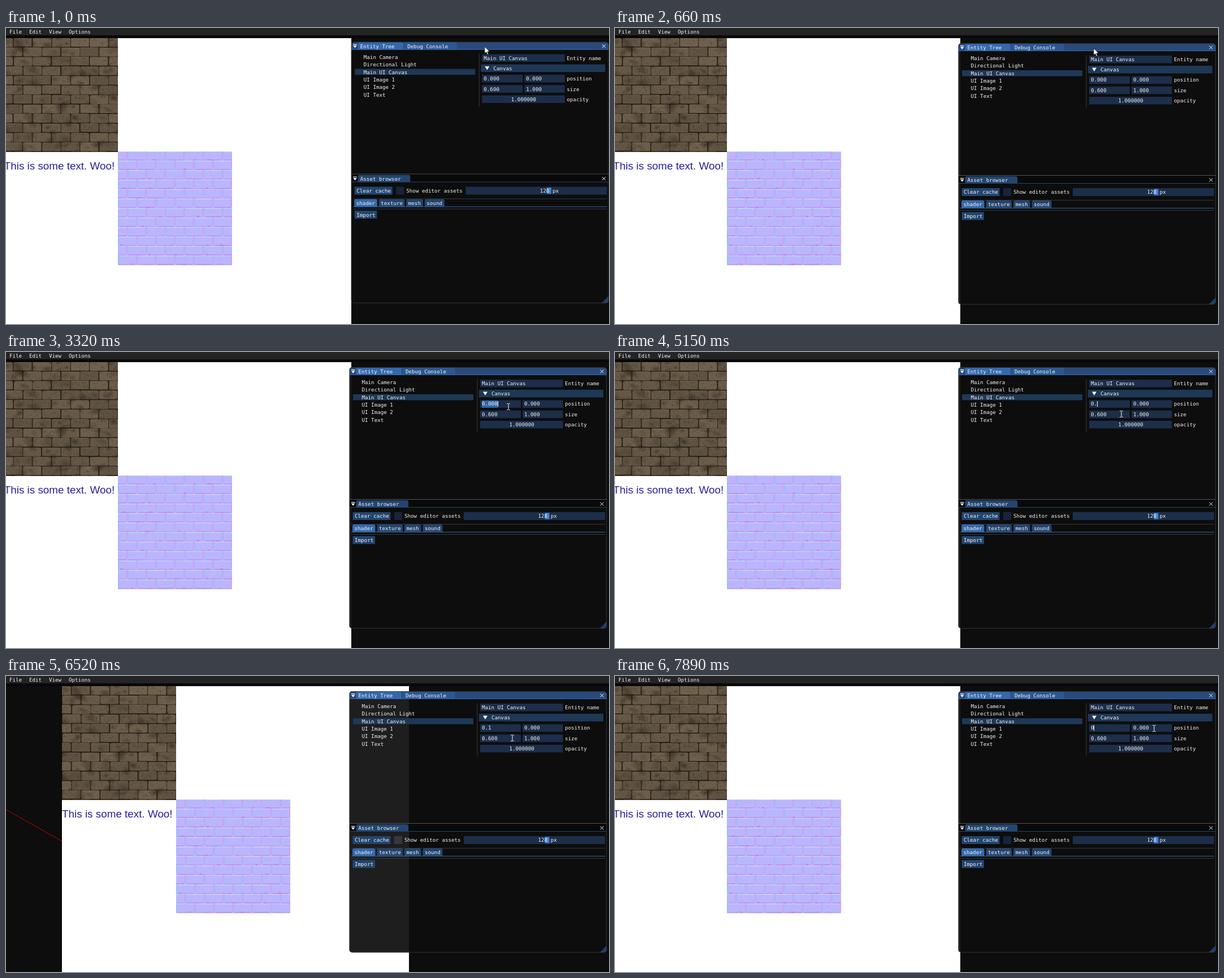
These frames come from a looping animation (1067 px wide and 525 px high, 8000 ms). An HTML page with a canvas:

```html
<!DOCTYPE html>
<html lang="en">
<head>
<meta charset="utf-8">
<title>Scene editor</title>
<style>
  html, body { margin: 0; width: 100%; height: 100%; overflow: hidden; background: #0d0d0d; }
  canvas { display: block; }
</style>
</head>
<body>
<canvas id="stage" width="1067" height="525"></canvas>
<script>
const ctx = document.getElementById('stage').getContext('2d');
const LOOP = 8000, CHAR = 5.54, TEXTURE = 202;
const MONO = '9.2px "DejaVu Sans Mono", monospace';
const FIELD = '#1c2e4a', BUTTON = '#23456f', TAB = '#3369ad', HEADER = '#1e3857', RULE = '#3a3a42';

let seed = 7;
const random = () => (seed = (seed * 16807) % 2147483647) / 2147483647;
const between = (a, b) => a + (b - a) * random();

// ---- Textures ----
function makeBricks(mortar, paintBrick, finish) {
  const canvas = document.createElement('canvas');
  canvas.width = canvas.height = TEXTURE;
  const g = canvas.getContext('2d');
  const w = TEXTURE / 6, h = TEXTURE / 12;
  g.fillStyle = mortar;
  g.fillRect(0, 0, TEXTURE, TEXTURE);
  for (let row = 0; row <= 12; row++)
    for (let col = -1; col < 6; col++)
      paintBrick(g, (col + (row % 2 ? 0 : 0.5)) * w, row * h - 1, w, h);
  finish(g);
  return canvas;
}

function speckle(g, x, y, w, h, count, color) {
  for (let i = 0; i < count; i++) {
    g.fillStyle = color();
    g.fillRect(between(x, x + w), between(y, y + h), between(1, 3), between(0.6, 1.6));
  }
}

const stone = makeBricks('#2b231a', (g, x, y, w, h) => {
  const jitter = () => between(0, 0.9);
  const left = x + 0.4 + jitter(), top = y + 0.4 + jitter();
  const width = w - 1 - jitter(), height = h - 1 - jitter();
  g.fillStyle = `hsl(34 18% ${between(31, 37)}%)`;
  g.beginPath();
  g.roundRect(left, top, width, height, between(1, 3));
  g.fill();
  g.fillStyle = 'rgba(150,134,110,.25)';
  g.fillRect(left + 2, top, width - 4, 1);
  speckle(g, left, top, width - 2, height - 1, 45, () =>
    random() < 0.55 ? `rgba(40,32,22,${between(0.05, 0.3)})` : `rgba(145,128,102,${between(0.05, 0.25)})`);
}, g => {
  for (let i = 0; i < 150; i++) {
    const r = between(2, 9);
    g.save();
    g.translate(between(0, TEXTURE), between(0, TEXTURE));
    g.rotate(between(-0.6, 0.6));
    g.scale(between(1, 2.2), 1);
    const blot = g.createRadialGradient(0, 0, 0, 0, 0, r);
    blot.addColorStop(0, `rgba(30,23,15,${between(0.1, 0.4)})`);
    blot.addColorStop(1, 'rgba(30,23,15,0)');
    g.fillStyle = blot;
    g.fillRect(-r, -r, 2 * r, 2 * r);
    g.restore();
  }
});

const normals = makeBricks('#c4b2f4', (g, x, y, w, h) => {
  const edge = (color, ex, ey, ew, eh) => {
    g.globalAlpha = between(0.4, 1);
    g.fillStyle = color;
    g.fillRect(ex, ey, ew, eh);
    g.globalAlpha = 1;
  };
  g.fillStyle = '#bab6fd';
  g.beginPath();
  g.roundRect(x + 0.7, y + 0.7, w - 1.4, h - 1.4, 2.5);
  g.fill();
  edge('#d8e4fc', x + 2, y + 0.6, w - 4, 1);
  edge('#bd7cea', x + 2, y + h - 1.4, w - 4, 1.2);
  edge('#74cdf2', x + 0.5, y + 2, 1.2, h - 4);
  edge('#e58af0', x + w - 1.6, y + 2, 1.1, h - 4);
  if (random() < 0.5) edge('#7ff0dc', x + between(0, 22), y + 0.4, between(3, 10), 1.3);
  if (random() < 0.5) edge('#d55fe8', x + between(2, 28), y + h - 2, between(2, 6), 1.5);
  speckle(g, x + 2, y + 2, w - 5, h - 4, 10, () =>
    random() < 0.5 ? 'rgba(205,190,255,.3)' : 'rgba(165,165,246,.3)');
}, () => {});

// ---- Drawing helpers ----
function rect(x, y, right, bottom, color, radius = 0) {
  ctx.fillStyle = color;
  ctx.beginPath();
  ctx.roundRect(x, y, right - x, bottom - y, radius);
  ctx.fill();
}
function shape(color, ...points) {
  ctx.fillStyle = color;
  ctx.beginPath();
  points.forEach(([x, y]) => ctx.lineTo(x, y));
  ctx.closePath();
  ctx.fill();
}
function line(color, x1, y1, x2, y2, width = 1) {
  ctx.strokeStyle = color;
  ctx.lineWidth = width;
  ctx.beginPath();
  ctx.moveTo(x1, y1);
  ctx.lineTo(x2, y2);
  ctx.stroke();
}
function label(text, x, middle) {
  ctx.font = MONO;
  ctx.fillStyle = '#f4f4f4';
  ctx.fillText(text, x, Math.round(middle + 3));
}
function field(text, x, y, right) {
  rect(x, y, right, y + 13.5, FIELD);
  label(text, x + 3, y + 6.8);
}
function button(text, x, y, right, color = BUTTON, radius = 0) {
  rect(x, y, right, y + 14, color, radius);
  label(text, x + 3.5, y + 7);
}
function titleIcons(y) {
  rect(611, y - 3.5, 617.5, y - 2.3, '#fff');
  shape('#fff', [611, y - 1], [617.5, y - 1], [614.2, y + 3.2]);
  line('#fff', 1051.5, y - 3, 1057.5, y + 3);
  line('#fff', 1051.5, y + 3, 1057.5, y - 3);
}

// ---- State over time ----
// Position field: [start time, text, caret shown, all selected]
const edits = [
  [0, '0.000', false, false], [3320, '0.000', true, true], [4380, '0.000', false, true],
  [4750, '0.000', true, true], [4940, '0', true], [5150, '0.', true], [5460, '0.1', true],
  [6520, '0.1', false], [6760, '0.', true], [6820, '0', true], [7030, '', true], [7100, '0', true]
];

// Pointer: [first step, last step, steps, waypoints]
const moves = [
  [500, 500, 1, [[847, 36]]],
  [1340, 1340, 1, [[847, 42]]],
  [1610, 2410, 11, [[732, 105], [831, 142], [922, 180], [922, 98]]],
  [2500, 3110, 9, [[854, 66], [889, 97]]],
  [3530, 3730, 4, [[896, 110]]],
  [7570, 7890, 6, [[954, 93]]]
];

function pointerAt(t) {
  let pos = [847, 33];
  for (const [start, end, steps, points] of moves) {
    if (t < start) break;
    const path = [pos, ...points];
    const done = end > start ? Math.floor((t - start) / (end - start) * (steps - 1)) + 1 : 1;
    const u = Math.min(1, done / steps) * points.length;
    const i = Math.min(points.length - 1, Math.floor(u));
    pos = path[i].map((v, axis) => Math.round(v + (path[i + 1][axis] - v) * (u - i)));
  }
  return pos;
}

// ---- Scene ----
function drawScene(offset) {
  rect(0, 0, 1067, 525, '#0d0d0d');
  const x = -3.3 + offset * 1024;
  if (offset) line('#c40000', 0, 237, x, 293);
  rect(Math.floor(x), 18, Math.floor(x + 614.4), 525, '#fff');
  ctx.drawImage(stone, Math.floor(x), 18);
  ctx.drawImage(normals, Math.round(x + 201.6), 219);
  ctx.font = '18.85px "Liberation Sans", Arial, sans-serif';
  ctx.fillStyle = '#281e9c';
  ctx.fillText('This is some text. Woo!', x, 251);
  rect(0, 13, 1067, 18, '#080808');
  rect(0, 0, 1067, 13, '#242424');
  ['File', 'Edit', 'View', 'Options'].forEach((name, i) => label(name, 6 + 35 * i, 6.5));
}

function drawEntityPanel(edit) {
  rect(608, 28, 1063, 41, '#294a7a', [5, 5, 0, 0]);
  rect(619.5, 28, 700, 41, TAB, [3, 3, 0, 0]);
  rect(701.5, 28, 794.5, 41, '#2c5794', [3, 3, 0, 0]);
  rect(608, 40, 1063, 41, TAB);
  titleIcons(34.5);
  label('Entity Tree', 623.5, 34.5);
  label('Debug Console', 707, 34.5);

  rect(614, 75, 827, 85.5, HEADER);
  ['Main Camera', 'Directional Light', 'Main UI Canvas', 'UI Image 1', 'UI Image 2', 'UI Text']
    .forEach((name, i) => label(name, 629.5, 54 + i * 13.35));
  rect(833.5, 48, 834.5, 142, RULE);

  field('Main UI Canvas', 839, 49, 985.5);
  label('Entity name', 989, 56);
  rect(837, 67, 1057, 80.5, HEADER);
  shape('#fff', [844, 70.5], [852, 70.5], [848, 77]);
  label('Canvas', 859, 74);

  const [, text, caret, selected] = edit;
  field('', 839, 85.5, 911);
  if (selected) rect(842, 86, 870, 99, '#3064a4');
  label(text, 842, 92.3);
  if (caret) rect(Math.floor(842.4 + text.length * CHAR), 87, Math.floor(843.4 + text.length * CHAR), 97, '#fff');
  field('0.000', 914, 85.5, 985.5);
  label('position', 989, 92.3);
  field('0.600', 839, 103.7, 911);
  field('1.000', 914, 103.7, 985.5);
  label('size', 989, 110.5);
  field('', 839, 122, 985.5);
  label('1.000000', 890.5, 128.8);
  label('opacity', 989, 128.8);
}

function drawAssetPanel(shifted) {
  rect(608, 261, 1063, 262, '#55555c');
  rect(608, 262, 1063, 276, 'rgba(8,8,8,.8)');
  rect(619.5, 263, 712, 276, BUTTON, [3, 3, 0, 0]);
  rect(608, 275, 1063, 276, BUTTON);
  titleIcons(269.5);
  label('Asset browser', 623.5, 269.5);

  button('Clear cache', 613.5, 284, 680.5);
  rect(687, 284, 701, 298, shifted ? '#36373f' : '#17243a');
  label('Show editor assets', 705, 291);
  rect(810, 284, 1060, 298, FIELD);
  rect(953.5, 285.5, 961.5, 296.5, '#3d85e0');
  label('128 px', 941.5, 291);
  rect(611, 305, 1060, 306, RULE);

  const top = [3, 3, 0, 0];
  button('shader', 613, 306, 653.5, TAB, top);
  button('texture', 656.5, 306, 702, BUTTON, top);
  button('mesh', 705, 306, 734.5, BUTTON, top);
  button('sound', 737.5, 306, 772.5, BUTTON, top);
  rect(611, 319, 1060, 320, TAB);
  rect(611, 323, 1060, 324, RULE);
  button('Import', 613.5, 326.5, 653);
}

function drawPointer(t) {
  const [x, y] = pointerAt(t);
  ctx.save();
  ctx.translate(x, y);
  if (t < 3000) {
    const arrow = [[0, 0], [0, 12], [2.8, 9.6], [4.8, 14], [6.6, 13.2], [4.8, 9], [8.4, 8.6]];
    shape('#fff', ...arrow);
    ctx.strokeStyle = '#000';
    ctx.lineWidth = 0.6;
    ctx.stroke();
  } else {
    rect(-0.5, -5, 0.5, 5, '#fff');
    for (const side of [-1, 1]) {
      rect(-3, side * 5.5 - 0.5, -0.5, side * 5.5 + 0.5, '#ddd');
      rect(0.5, side * 5.5 - 0.5, 3, side * 5.5 + 0.5, '#ddd');
    }
  }
  ctx.restore();
}

function draw() {
  const t = performance.now() % LOOP;
  const edit = edits.findLast(([start]) => t >= start);
  const offset = edit[1] === '0.1' ? 0.1 : 0;
  drawScene(offset);

  ctx.save();
  ctx.translate(t < 70 ? 3.3 : 0, t < 660 ? -2.4 : 0);
  rect(607.4, 27, 1063, 490.5, 'rgba(13,13,13,.93)', 5);
  drawEntityPanel(edit);
  drawAssetPanel(offset > 0);
  shape('#1c3d69', [1051, 490], [1062.5, 478], [1062.5, 487], [1060, 490]);
  ctx.strokeStyle = 'rgba(110,110,128,.5)';
  ctx.lineWidth = 0.8;
  ctx.beginPath();
  ctx.roundRect(607.8, 27.4, 454.8, 462.7, 5);
  ctx.stroke();
  ctx.restore();

  drawPointer(t);
  requestAnimationFrame(draw);
}
draw();
</script>
</body>
</html>
```
